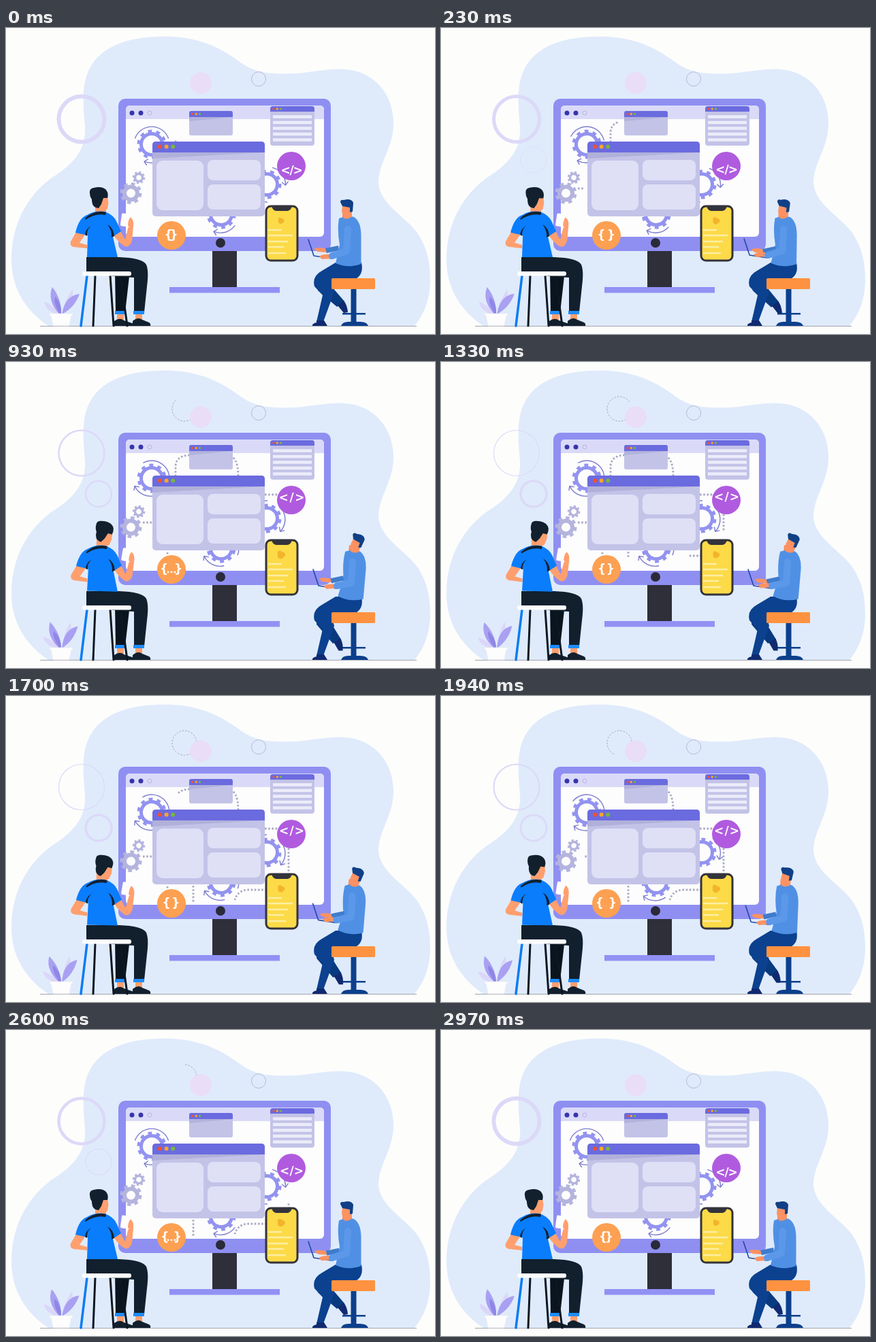
Write an HTML page that moves like this. It is 630 px wide and 450 px high and loops after 3000 ms.

```html
<!DOCTYPE html>
<html lang="en">
<head>
<meta charset="utf-8">
<title>Developers at work</title>
<style>
  html, body { margin: 0; width: 100%; height: 100%; overflow: hidden; background: #fdfdfc; }
  svg { display: block; width: 630px; height: 450px; }
  text { font: bold 17px "DejaVu Sans", sans-serif; fill: #fff; text-anchor: middle; }
  .line { fill: none; stroke-linecap: round; stroke-linejoin: round; }
  .panel { fill: #dfdff6; }
  .bar { fill: #6b6be0; }
  .pane { fill: #c3c3e8; }
  .skin { fill: #ff9f6e; }
  .dark { fill: #12202e; }
  .dots { fill: none; stroke: #a9a9c4; stroke-width: 2.8; }
</style>
</head>
<body>
<svg viewBox="0 0 630 450">
  <defs>
    <g id="cog">
      <g fill="none" stroke="#9393f0">
        <circle r="15.5" stroke-width="5"/>
        <circle r="19" stroke-width="5" stroke-dasharray="5.6 6.34"/>
      </g>
      <g class="line" stroke="#7c7cd0" stroke-width="1.4">
        <path d="M-24.4 -8.9A26 26 0 0 1 24.4 -8.9M20 16.7A26 26 0 0 1 -10 25.7"/>
        <path d="M-5.5 22L-11 25.3L-7.5 30.5"/>
      </g>
    </g>
    <g id="lights">
      <circle r="3" fill="#f4502c"/><circle cx="9.6" r="3" fill="#ffa624"/><circle cx="19.2" r="3" fill="#78b83c"/>
    </g>
  </defs>

  <path fill="#dfebfb" d="M62 438C28 415 8 382 8 340C8 292 28 250 66 221C100 200 118 178 116 145C113 112 111 84 122 61C139 26 182 12 235 12.500C286 13 318 31 345 51C367 67 392 68 420 67C455 65 480 57 508 62C548 70 569 104 569 140C569 176 547 198 547 228C549 259 586 277 603 300C619 323 623 345 623 373C622 402 613 422 600 438Z"/>

  <g fill="none" stroke="#dcd9f8">
    <circle id="ringA" cx="111" cy="134" r="33.5"/>
    <circle id="ringB" cx="136" cy="194" r="19"/>
  </g>
  <circle cx="371" cy="75" r="10.5" fill="none" stroke="#b9bad8"/>
  <path id="orbit" fill="none" stroke="#a3a4b4" d="M280 69A18 18 0 0 1 244 69A18 18 0 0 1 280 69"/>
  <circle cx="286" cy="81" r="16" fill="#e9ddf7"/>

  <!-- monitor -->
  <path fill="#2f2f3a" d="M303 326h36v56h-36z"/>
  <path fill="#9191f4" d="M240 381h162v8.500H240z"/>
  <rect x="165" y="104" width="312" height="224" rx="10" fill="#8f8ff2"/>
  <rect x="176" y="114" width="291" height="193" rx="6" fill="#fdfdfd"/>
  <path fill="#dadaf8" d="M176 134v-14q0-6 6-6h279q6 0 6 6v14z"/>
  <g fill="#3535ae"><circle cx="185" cy="125" r="3.500"/><circle cx="198" cy="125" r="3.500"/></g>
  <circle cx="211" cy="125" r="3" fill="none" stroke="#b7b5dc"/>
  <circle cx="315" cy="316" r="7" fill="#2a2a38"/>

  <g transform="translate(214 171)"><use class="spin" href="#cog"/></g>
  <g transform="translate(383 230) rotate(-111)"><use class="spin" href="#cog"/></g>
  <g transform="translate(316 274)"><use class="spin" href="#cog"/></g>
  <g fill="none" stroke="#b4b4de">
    <g transform="translate(183.500 243)"><g class="spin">
      <circle r="9.500" stroke-width="6"/><circle r="13.500" stroke-width="5" stroke-dasharray="5.3 5.3"/>
    </g></g>
    <g transform="translate(195 220)"><g class="spin">
      <circle r="5.500" stroke-width="3.500"/><circle r="7.800" stroke-width="3" stroke-dasharray="3.06 3.06"/>
    </g></g>
  </g>
  <g id="links"></g>

  <!-- windows -->
  <rect class="pane" x="269" y="122" width="64" height="36" rx="3"/>
  <path class="bar" d="M269 131v-6q0-3 3-3h58q3 0 3 3v6z"/>
  <use href="#lights" transform="translate(274 126.500) scale(.55)"/>
  <path fill="#b2b2dc" d="M269 131h64l-64 6z"/>
  <rect class="pane" x="388" y="115" width="65" height="58" rx="4"/>
  <path class="bar" d="M388 123v-4q0-4 4-4h57q4 0 4 4v4z"/>
  <use href="#lights" transform="translate(393 119) scale(.55)"/>
  <path stroke="#ececfa" stroke-width="4.500" d="M392 130.500h57M392 139h57M392 147.500h57M392 156h57M392 164.500h57"/>
  <rect class="pane" x="215" y="167" width="165" height="110" rx="5"/>
  <path class="bar" d="M215 183v-11q0-5 5-5h155q5 0 5 5v11z"/>
  <path fill="#b0b0da" d="M215 183h165l-165 9z"/>
  <use href="#lights" x="226" y="174.500"/>
  <rect class="panel" x="221" y="195" width="69" height="73" rx="9"/>
  <rect class="panel" x="296" y="194" width="78" height="30" rx="8"/>
  <rect class="panel" x="296" y="230" width="78" height="37" rx="8"/>

  <!-- badges -->
  <circle cx="419" cy="203" r="21" fill="#b05bdf"/>
  <g id="tag"><text>&lt;</text><text>/</text><text>&gt;</text></g>
  <circle cx="243" cy="305" r="21" fill="#fda052"/>
  <g id="brace"><text y="310">{</text><text y="310">}</text></g>
  <g id="ellipsis" fill="#fff"><circle cx="238" cy="309" r="1.400"/><circle cx="243" cy="309" r="1.400"/><circle cx="248" cy="309" r="1.400"/></g>

  <!-- phone -->
  <rect x="382" y="262" width="46" height="80" rx="7" fill="#fcda48" stroke="#33333c" stroke-width="3"/>
  <path fill="#33333c" d="M390 262h30q-2 7-7 7h-16q-5 0-7-7z"/>
  <path id="play" fill="#f3b42c" d="M-5 -3Q-5 -6 -1 -5L5 -2Q7 0 5 3L1 6Q-3 7 -5 3Z"/>
  <path stroke="#fdeea2" stroke-width="2.500" d="M385 297h20M385 305h36M385 314h29M385 322h23M385 331h26"/>

  <path stroke="#a3a4ae" d="M50 438.500H603"/>

  <!-- plant -->
  <g id="leaves">
    <path fill="#dcd6fa" d="M76 421Q58 416 56 402Q70 407 76 421M84 421Q83 405 98 384Q100 405 84 421"/>
    <path fill="#a9a0f2" d="M78 421Q60 400 68 381Q82 399 81 421M82 421Q87 393 108 391Q101 411 82 421"/>
    <path fill="#8f86e6" d="M79 421Q69 404 72 395Q82 404 81 421"/>
  </g>
  <path fill="#fdfdfd" stroke="#e6e6ee" stroke-width=".6" d="M64 420H98V423H96L93 438H69L66 423H64Z"/>

  <!-- sitter on the left -->
  <path class="skin" d="M163 420h10v10h-10zM190 420h10v10h-10z"/>
  <path class="dark" d="M159 438V431Q167 425 173 430L188 435Q191 436 190 438ZM186 438V431Q194 424 200 429L210 433Q213 435 212 438Z"/>
  <path fill="#0a141e" d="M160 358L181 365L175 418H161Z"/>
  <path class="dark" d="M118 337H166Q200 338 206 348Q210 357 207 380L203 418H188V367Q160 366 138 362L118 360Z"/>
  <path fill="#1e8cff" d="M160 416h16v5h-16zM187 416h16v5h-16z"/>
  <g class="line" stroke-width="3" stroke-linecap="butt">
    <path stroke="#0d1722" d="M131 364L128 438M153 364L158 438M168 364L178 438"/>
    <path stroke="#0a7cf4" stroke-width="3.500" d="M119 364L110 438"/>
  </g>
  <rect x="112" y="358" width="72" height="6.500" rx="3" fill="#fdfdfd"/>
  <g id="sitter">
    <path class="skin" d="M103 300L116 304L108 316L119 319V324L99 322Q93 320 95 314ZM155 300L167 296Q172 307 175 311L180 291Q177 284 182 278Q188 281 187 291L185 313Q180 327 170 318Q162 312 155 300Z"/>
    <path class="skin" d="M131 260H147V275H131Z"/>
    <path fill="#0a7dfc" d="M119 275Q131 268 145 270Q158 275 162 284L169 299L157 307L164 337H119L120 305L102 301Q107 279 119 275Z"/>
    <path class="dark" d="M116 280Q130 267 147 271L146 275Q131 272 117 282ZM149 289Q158 294 159 306L155 308Q156 298 149 289ZM125 291Q118 296 119 306L116 304Q117 295 125 291Z"/>
    <rect x="169" y="273" width="14" height="19" rx="2" fill="#fdfdfd" transform="rotate(8 176 282)"/>
    <path class="skin" d="M179 291Q179 282 183 278L186 284V295Z"/>
    <g id="headA">
      <path class="skin" d="M137 247H149L150.500 257L149 266Q145 270 138 267L134 260Z"/>
      <path class="dark" d="M123 243Q122 236 129 235Q141 232 147 238Q151 243 149 250L143 250L140 259L136 265Q126 265 126 252Q123 248 123 243Z"/>
    </g>
  </g>

  <!-- sitter on the right -->
  <path fill="#0c3f8c" d="M506.500 382h8v51h-8zM492 438Q494 432 503 432H520Q530 432 532 438ZM494 419h34v2.500h-34z"/>
  <g id="shin">
    <path fill="#083a80" d="M455 371Q462 364 472 373L497 402L486 410L458 386Z"/>
    <path fill="#102a70" d="M487 408L496 401Q501 407 502 418L496 419Z"/>
  </g>
  <path fill="#0b418e" d="M484 345H522Q526 364 511 370L478 374L482 388L466 432H456L465 393L453 380Q449 365 464 357Z"/>
  <path fill="#102a70" d="M456 430H467L472 438H450Q449 435 456 433Z"/>
  <rect x="478" y="368" width="64" height="16" rx="1.500" fill="#ff9240"/>
  <g id="worker">
    <path fill="#fb8d5e" d="M494 270H508V282H494Z"/>
    <path fill="#5090e4" d="M489 280Q500 275 511 278Q521 284 521.500 304V347Q503 354 484 346L490 319Q486 297 489 280Z"/>
    <g id="headB">
      <path fill="#fc9263" d="M494 260H508V277Q503 282 496 280L493 270Z"/>
      <path fill="#103f86" d="M491 256Q491 252 496 253Q507 250 510 257L509 270L505 271V264L494 262Z"/>
    </g>
  </g>
  <g id="desk">
    <path class="line" stroke="#2449a4" stroke-width="1.600" d="M444 311L452 335L478 339"/>
    <g id="handA"><path fill="#fc9263" d="M453 326Q458 322 473 326V331L459 330Z"/><path fill="#3f7ccc" d="M470 325L489 321L490 328L472 332Z"/></g>
    <g id="handB"><path fill="#fc9263" d="M459 335Q464 331 476 332V338L463 339Z"/></g>
  </g>
  <path id="sleeve" class="line" stroke="#5b98ea" stroke-width="10"/>
</svg>
<script>
const $ = id => document.getElementById(id);
const LOOP = 3000;
const clamp = x => Math.max(0, Math.min(1, x));
const ramp = (t, a, b) => clamp((t - a) / (b - a));
const ease = x => (1 - Math.cos(Math.PI * x)) / 2;
const turn = (el, deg, x = 0, y = 0) => el.setAttribute('transform', `rotate(${deg} ${x} ${y})`);
const move = (el, x, y) => el.setAttribute('transform', `translate(${x} ${y})`);

// Shows the dotted part of a path between two fractions of its length.
function reveal(path, from, to, dot, gap) {
  const len = path.getTotalLength(), step = dot + gap;
  const first = Math.ceil(from * len / step);
  const count = Math.max(0, Math.ceil(to * len / step) - first);
  path.style.visibility = count ? 'visible' : 'hidden';
  path.setAttribute('stroke-dasharray', `0 ${first * step}` + ` ${dot} ${gap}`.repeat(count) + ` 0 ${len + step}`);
}

// path, draw start and end, erase start and end
const links = [
  ['M249 168V153Q250 138 269 137H325Q341 138 341 168', 0, 930, 1600, 2150],
  ['M201 236H217', 100, 400, 1800, 2150],
  ['M380 195H400', 700, 930, 2250, 2550],
  ['M415 224V263', 1000, 1500, 2200, 2750],
  ['M383 285H355Q340 286 336 300', 1200, 1650, 2650, 2950],
  ['M275 279V305', 1200, 1650, 2650, 2950],
  ['M237 280V286', 850, 950, 1750, 1900]
].map(([d, ...times]) => {
  const path = document.createElementNS('http://www.w3.org/2000/svg', 'path');
  path.setAttribute('d', d);
  path.setAttribute('class', 'dots');
  $('links').append(path);
  return { path, times };
});
const spinners = document.querySelectorAll('.spin');

function draw(t) {
  const pose = ease(ramp(t, 0, 880)) - ease(ramp(t, 1600, 2250));
  const wave = (1 - Math.cos(2 * Math.PI * t / LOOP)) / 2;
  const fold = 1 - Math.abs(t / 1500 - 1);

  $('ringA').setAttribute('stroke-width', 6 - 5.5 * fold);
  $('ringB').setAttribute('stroke-width', 4 * fold);
  reveal($('orbit'), ramp(t, 1500, 3000), ramp(t, 0, 1500), 2.5, 2);
  for (const { path, times: [a, b, c, d] } of links)
    reveal(path, ramp(t, c, d), ramp(t, a, b), 2.6, 2.6);
  spinners.forEach(el => turn(el, 42 * pose));

  const lift = clamp(1.3 * wave);
  [...$('tag').children].forEach((el, i) => {
    el.setAttribute('x', 419.5 + (i - 1) * (9 + 3 * Math.sin(Math.PI * clamp(lift * .7))));
    el.setAttribute('y', 215 - 11 * lift);
  });

  const beat = t % 1500 / 1500;
  const spread = 4 + 7 * Math.sin(Math.PI * beat);
  [...$('brace').children].forEach((el, i) => el.setAttribute('x', 242.5 + (i ? spread : -spread)));
  $('ellipsis').setAttribute('opacity', ramp(beat, .28, .45) * (1 - ramp(beat, .75, .9)));
  $('play').setAttribute('transform', `translate(404 283) scale(${.8 + .25 * Math.sin(Math.PI * beat)})`);

  turn($('leaves'), -7 * wave, 80, 420);
  turn($('sitter'), 1.5 * pose, 140, 338);
  turn($('headA'), 13 * pose, 138, 271);

  $('worker').setAttribute('transform', `translate(${3 * pose}) rotate(${5 * pose} 505 350)`);
  turn($('headB'), 15 * pose, 502, 281);
  turn($('shin'), 9 * pose, 457, 374);
  const dx = 7 * pose, dy = -6 * pose;
  const tap = 2 * Math.cos(2 * Math.PI * t / 500);
  move($('desk'), dx, dy);
  move($('handA'), -tap / 2, -tap / 2);
  move($('handB'), tap / 2, tap / 2);
  $('sleeve').setAttribute('d', `M${502 + dx} ${296 + dy / 3}L${500 + dx} ${328 + dy / 2}L${479 + dx} ${335 + dy}`);
}

function frame() {
  draw(performance.now() % LOOP);
  requestAnimationFrame(frame);
}
frame();
</script>
</body>
</html>
```
